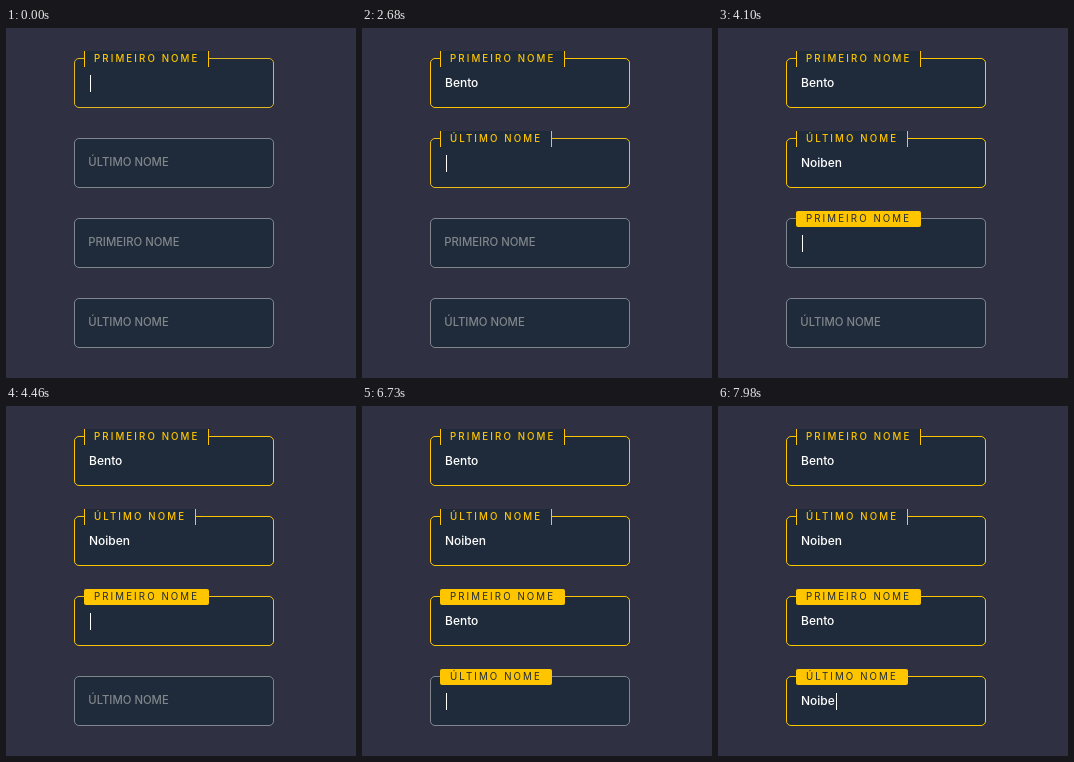
These frames come from a looping animation (350x350 px, 8 s). An HTML page:

```html
<!DOCTYPE html>
<html lang="pt">
<head>
<meta charset="utf-8">
<title>Campos</title>
<style>
  html, body { margin: 0; width: 100%; height: 100%; overflow: hidden; background: #2f3142; }
  svg { display: block; width: 350px; height: 350px; }
  text { font-family: Inter, "Open Sans", sans-serif; font-weight: 500; }
  .hint { font-size: 11.3px; fill: #80868b; }
  .tag { font-size: 9.7px; letter-spacing: 2.1px; fill: #ffc600; }
  .solid .tag { font-weight: 400; fill: #1f2b3a; }
  .value { font-size: 12px; fill: #fff; }
</style>
</head>
<body>
<svg id="stage" viewBox="0 0 350 350"></svg>
<script>
const LOOP = 8000, FADE = 500;
const DARK = '#1f2b3a', GOLD = [255, 198, 0], GREY = [128, 134, 144];
const stage = document.getElementById('stage');

// focus/blur: active span; fade: start of the border change;
// keys: time of each letter; hidden: spans where the caret is off
const fields = [
  { y: 30, label: 'PRIMEIRO NOME', width: 125, text: 'Bento',
    focus: 0, blur: 2400, fade: -230,
    keys: [1550, 1660, 1840, 2020, 2130], hidden: [[780, 1290]] },
  { y: 110, label: 'ÚLTIMO NOME', width: 112, text: 'Noiben',
    focus: 2400, blur: 4100, fade: 2400,
    keys: [2990, 3450, 3560, 3670, 3770, 3880], hidden: [] },
  { y: 190, label: 'PRIMEIRO NOME', width: 125, text: 'Bento', solid: true,
    focus: 4100, blur: 6730, fade: 4100,
    keys: [5140, 5300, 5490, 5680, 5790], hidden: [[4720, 5140], [6300, 6730]] },
  { y: 270, label: 'ÚLTIMO NOME', width: 112, text: 'Noiben', solid: true,
    focus: 6730, blur: LOOP, fade: 6730,
    keys: [7510, 7620, 7730, 7880, 7980], hidden: [[7360, 7510]] }
];

function add(parent, name, attrs, text) {
  const el = document.createElementNS('http://www.w3.org/2000/svg', name);
  for (const key in attrs) el.setAttribute(key, attrs[key]);
  if (text) el.textContent = text;
  parent.appendChild(el);
  return el;
}

const show = (el, on) => el.setAttribute('visibility', on ? 'visible' : 'hidden');

// CSS "ease": cubic-bezier(.25, .1, .25, 1)
function ease(x) {
  if (x <= 0) return 0;
  if (x >= 1) return 1;
  const curve = (a, b, u) => 3 * a * u * (1 - u) ** 2 + 3 * b * u * u * (1 - u) + u ** 3;
  let lo = 0, hi = 1;
  for (let i = 0; i < 20; i++) {
    const mid = (lo + hi) / 2;
    if (curve(.25, .25, mid) < x) lo = mid; else hi = mid;
  }
  return curve(.1, 1, lo);
}

const mix = k => `rgb(${GREY.map((c, i) => Math.round(c + (GOLD[i] - c) * k))})`;

function build(f) {
  const g = add(stage, 'g', { transform: `translate(0 ${f.y})`, class: f.solid ? 'solid' : 'open' });
  f.box = add(g, 'rect', { x: 68.5, y: .5, width: 199, height: 49, rx: 4.5, fill: DARK });
  f.hint = add(g, 'text', { class: 'hint', x: 82.3, y: 28 }, f.label);
  f.tag = add(g, 'g', {});
  const gold = `rgb(${GOLD})`;
  add(f.tag, 'rect', { x: 78, y: -7, width: f.width, height: 16,
    rx: f.solid ? 2 : 0, fill: f.solid ? gold : DARK });
  if (!f.solid) {
    for (const x of [78, 77 + f.width])
      add(f.tag, 'rect', { x, y: -7, width: 1, height: 16, fill: gold });
  }
  add(f.tag, 'text', { class: 'tag', x: 88, y: 4 }, f.label);
  f.value = add(g, 'text', { class: 'value', x: 83, y: 29 });
  f.caret = add(g, 'rect', { y: 17, width: 1, height: 17, fill: '#fff' });
}

function draw(t) {
  for (const f of fields) {
    const active = t >= f.focus;
    const count = f.keys.filter(k => t >= k).length;
    const typed = f.text.slice(0, count);
    if (f.value.textContent !== typed) f.value.textContent = typed;
    const off = f.hidden.some(([a, b]) => t >= a && t < b);
    const end = count ? Math.round(f.value.getComputedTextLength()) : 0;
    f.box.setAttribute('stroke', mix(ease((t - f.fade) / FADE)));
    f.caret.setAttribute('x', 84 + end);
    show(f.hint, !active);
    show(f.tag, active);
    show(f.caret, active && t < f.blur && !off);
  }
}

fields.forEach(build);
const start = performance.now();
function tick() {
  draw((performance.now() - start) % LOOP);
  requestAnimationFrame(tick);
}
tick();
</script>
</body>
</html>
```
